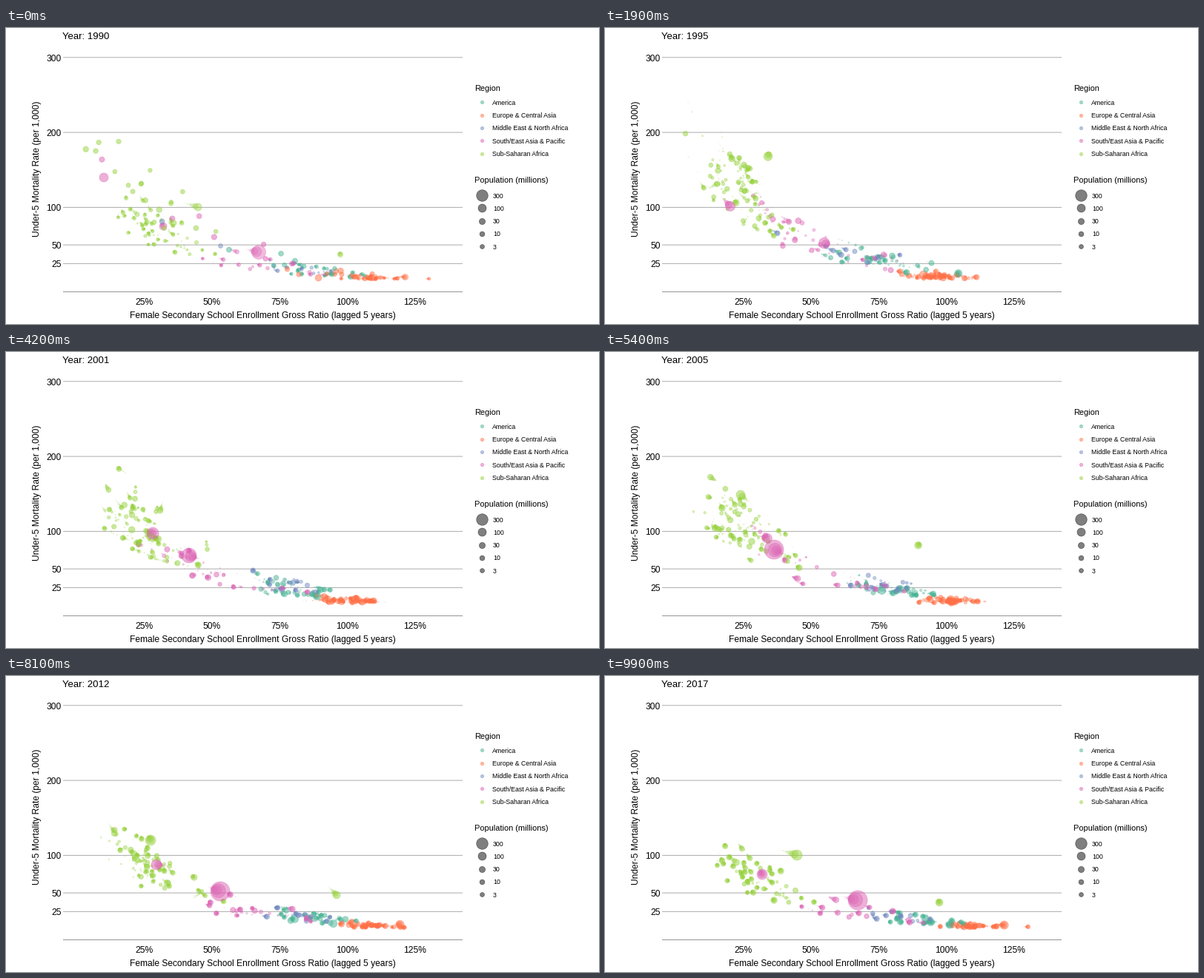
Animation of 800 by 400 pixels, one loop 10000 ms. Source, as a matplotlib script:

```python
import numpy as np
import matplotlib.pyplot as plt
from matplotlib.animation import FuncAnimation
from matplotlib.colors import to_rgb

W, H, DPI, FRAMES = 800, 400, 100, 100
FIRST_YEAR, YEARS = 1990, 28
WAKE = 10
ALPHA = 0.5

TEAL, CORAL, BLUE, PINK, LIME = "#46b394", "#ff7046", "#7189c0", "#dc62b3", "#96d23c"

plt.rcParams["font.family"] = "Liberation Sans"
rng = np.random.default_rng(11)
t = np.arange(FRAMES)
year = (YEARS - 1) * t / (FRAMES - 1)
bubbles = []


def radius(pop):
    return 2.4 + 0.31 * np.sqrt(pop)


def value_y(rate):
    return 343.8 - 1.0135 * rate


def trend_y(x, k, factor):
    """Mortality falls off exponentially with enrolment and shrinks every year."""
    return 341 - (208 - 2.9 * k) * np.exp((100 - x) / 150) * factor


def wander(color, x_first, x_last, skew, level, spread):
    """One bubble that hops along its region's band; hops get rarer with time."""
    u, v = rng.beta(*skew), rng.normal()
    xs, ys = [], []
    for k in range(YEARS):
        p = k / (YEARS - 1)
        if rng.random() < 0.65 - 0.5 * p:
            u = 0.6 * u + 0.4 * rng.beta(*skew) + rng.normal(0, 0.06)
            v = 0.5 * v + rng.normal(0, 0.85)
        u = np.clip(u + rng.normal(0, 0.012), 0, 1)
        lo, hi = (1 - p) * np.array(x_first) + p * np.array(x_last)
        x = lo + (hi - lo) * u
        xs.append(x)
        ys.append(trend_y(x, k, level * np.exp(spread * np.clip(v, -1.7, 1.4))))
    known = rng.random(YEARS) < np.where(np.arange(YEARS) < 2, 0.5, 0.93)
    r = radius(min(rng.lognormal(np.log(8), 1.1), 110))
    grid = np.arange(YEARS)
    bubbles.append((np.interp(year, grid, xs), np.interp(year, grid, ys),
                    known[year.astype(int)], np.full(FRAMES, r), color))


def lead(color, *points):
    """A large bubble through a few (frame, x, y, radius) points."""
    f, x, y, r = zip(*points)
    bubbles.append((np.interp(t, f, x), np.interp(t, f, y), t >= f[0],
                    np.interp(t, f, r), color))


# color, count, x range at start and end, beta skew, level against trend, spread
bands = (
    (CORAL, 27, (335, 515), (385, 580), (1.7, 1.4), 0.32, 0.5),
    (TEAL, 18, (215, 470), (315, 505), (1.5, 1.2), 0.75, 0.33),
    (BLUE, 10, (205, 450), (320, 480), (1.3, 1.1), 0.85, 0.33),
    (PINK, 13, (128, 500), (205, 545), (1.0, 1.5), 0.8, 0.3),
    (LIME, 40, (102, 370), (136, 390), (1.1, 3.0), 1.05, 0.25),
)
for color, count, *band in bands:
    for _ in range(count):
        wander(color, *band)

lead(LIME, (17, 221, 170, 6), (42, 208, 214, 4), (54, 183, 193, 6),
     (81, 195, 222, 7), (99, 259, 242, 7))
lead(LIME, (48, 425, 258, 4.8), (65, 418, 267, 5), (81, 446, 296, 5), (99, 451, 306, 5))
lead(PINK, (0, 132, 202, 6), (19, 169, 241, 6.5), (42, 198, 245, 8),
     (65, 238, 258, 5), (81, 203, 255, 7), (99, 212, 268, 7))
lead(PINK, (17, 300, 292, 7), (42, 247, 275, 10), (54, 228, 267, 13),
     (65, 252, 277, 13), (81, 289, 291, 13), (99, 341, 303, 13))

X, Y, ON, R = (np.array([b[n] for b in bubbles]) for n in range(4))
RGB = np.array([to_rgb(b[4]) for b in bubbles])

fig = plt.figure(figsize=(W / DPI, H / DPI), dpi=DPI, facecolor="white")
ax = fig.add_axes([0, 0, 1, 1])
ax.set(xlim=(0, W), ylim=(H, 0))
ax.axis("off")


def area(r):
    return (2 * np.asarray(r) * 72 / DPI) ** 2


def label(x, y, s, px, **kw):
    return ax.text(x, y, s, fontsize=px * 72 / DPI, va="baseline", color="black", **kw)


def disc(x, y, r, color):
    rgba = [(*to_rgb(color), ALPHA)]
    ax.scatter([x], [y], s=area([r]), c=rgba, edgecolors=rgba, linewidths=0.5)


def rule(y, color):
    ax.plot([77, 616], [y, y], color=color, lw=0.77, zorder=0,
            solid_capstyle="butt", snap=False)


for rate in (300, 200, 100, 50, 25):
    y = value_y(rate)
    rule(y, "#b3b3b3")
    label(74.5, y + 4.8, str(rate), 12, ha="right")
rule(356.5, "#999999")
for n in range(1, 6):
    label(94.5 + 91.5 * n, 374, f"{25 * n}%", 12, ha="center")

label(346, 392, "Female Secondary School Enrollment Gross Ratio (lagged 5 years)", 12, ha="center")
label(45, 190.5, "Under-5 Mortality Rate (per 1,000)", 12, ha="center",
      rotation=90, rotation_mode="anchor")

label(632.5, 85, "Region", 11)
regions = (("America", TEAL), ("Europe & Central Asia", CORAL),
           ("Middle East & North Africa", BLUE),
           ("South/East Asia & Pacific", PINK), ("Sub-Saharan Africa", LIME))
for n, (name, color) in enumerate(regions):
    y = 100.2 + 17.4 * n
    disc(641.8, y, 2.2, color)
    label(655.5, y + 3.5, name, 8.8)

label(632.5, 209, "Population (millions)", 11)
for n, pop in enumerate((300, 100, 30, 10, 3)):
    y = 226 + 17.3 * n
    disc(642.3, y, radius(pop), "black")
    label(657, y + 3.5, str(pop), 8.8)

title = label(76.5, 15, f"Year: {FIRST_YEAR}", 13.2)
cloud = ax.scatter([], [], linewidths=0.5, zorder=2)


def draw(i):
    pos, size, rgba = [], [], []
    for age in range(WAKE - 1, -1, -1):
        j = (i - age) % FRAMES
        on = ON[:, j]
        scale = (1 - age / WAKE) ** 3  # cubic fall-off along the wake
        pos.append(np.column_stack((X[on, j], Y[on, j])))
        size.append(area(R[on, j] * scale))
        rgba.append(np.column_stack((RGB[on], np.full(on.sum(), ALPHA * scale ** 0.5))))
    rgba = np.vstack(rgba)
    cloud.set_offsets(np.vstack(pos))
    cloud.set_sizes(np.concatenate(size), DPI)
    cloud.set_facecolor(rgba)
    cloud.set_edgecolor(rgba)
    title.set_text(f"Year: {FIRST_YEAR + round(year[i])}")
    return cloud, title


anim = FuncAnimation(fig, draw, frames=FRAMES, interval=100, repeat=True, repeat_delay=0)
plt.show()
```
